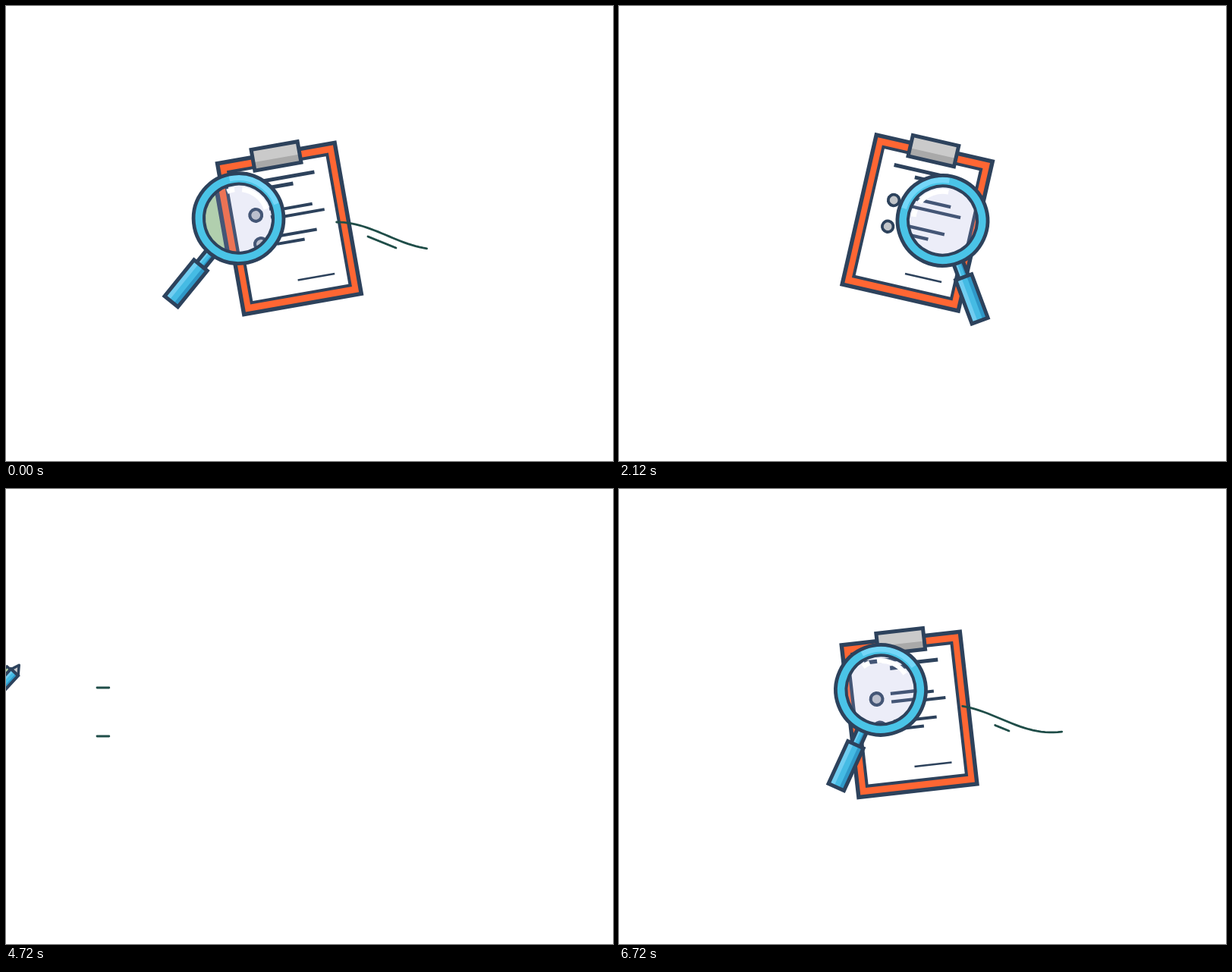
Recreate the animation shown at these times as an HTML page with a canvas. Size 800 by 600 pixels, loop 6.76 s.

```html
<!DOCTYPE html>
<html lang="en">
<head>
<meta charset="utf-8">
<title>Clipboard review</title>
<style>
  html, body { margin: 0; width: 100%; height: 100%; overflow: hidden; background: #fff; }
  canvas { display: block; width: 800px; height: 600px; }
</style>
</head>
<body>
<canvas id="stage" width="800" height="600"></canvas>
<script>
const ctx = document.getElementById('stage').getContext('2d');
const LOOP = 6760, STEP = 40, RESET = 4780;
const NAVY = '#2d425c', ORANGE = '#ff6633', TRAIL = '#1f4d48', GREEN = '#b5d9a2';
const RAD = Math.PI / 180, PEN_TILT = 42.5, PEN_REACH = 84.5;

const lerp = (a, b, k) => a + (b - a) * k;
const linear = (t, a, b) => Math.min(1, Math.max(0, (t - a) / (b - a)));
const ramp = (t, a, b) => {
  const k = linear(t, a, b);
  return k * k * (3 - 2 * k);
};
const wobble = (t, start) =>
  t < start ? 0 : Math.exp((start - t) / 120) * Math.sin((t - start) / 70);

function placed(x, y, angle, sx, sy, draw) {
  ctx.save();
  ctx.translate(x, y);
  ctx.rotate(angle * RAD);
  ctx.scale(sx, sy);
  draw();
  ctx.restore();
}

function paint(fill, stroke, width) {
  if (fill) { ctx.fillStyle = fill; ctx.fill(); }
  if (stroke) { ctx.strokeStyle = stroke; ctx.lineWidth = width; ctx.stroke(); }
}

function box(x, y, w, h, fill, stroke, width) {
  ctx.beginPath();
  ctx.rect(x, y, w, h);
  paint(fill, stroke, width);
}

function poly(points, fill, stroke, width, close = true) {
  ctx.beginPath();
  points.forEach(p => ctx.lineTo(p[0], p[1]));
  if (close) ctx.closePath();
  paint(fill, stroke, width);
}

function arc(r, a0, a1, color, width, fill) {
  ctx.beginPath();
  ctx.arc(0, 0, r, a0 * RAD, a1 * RAD);
  paint(fill, color, width);
}

function rule(x, y, length, width) {
  if (length > 0) poly([[x, y], [x + length, y]], null, NAVY, width, false);
}

// Three-tone bar with an outline, centred on x = 0.
function bar(y, w, h, outline) {
  box(-w / 2, y, w, h, '#45bbe4');
  box(-w / 2, y, w * 0.36, h, '#70cdf1');
  box(w * 0.18, y, w * 0.32, h, '#2f98c8');
  box(-w / 2, y, w, h, null, NAVY, outline);
}

// Time runs from -1980 (new board appears) to 4780 (old board is gone).
function boardPose(t) {
  const fall = ramp(t, -1560, -1320), rise = ramp(t, -1320, -1100);
  const hit = ramp(t, -150, 88), lift = ramp(t, -60, 100), sink = ramp(t, 300, 800);
  const slide = ramp(t, 780, 1290), swing = ramp(t, 820, 1290);
  const sign = ramp(t, 3440, 3680);
  const windup = ramp(t, 4220, 4440), leave = linear(t, 4400, 4740) ** 2;
  return {
    x: 399 - 37 * hit + 31.2 * slide + 14.4 * sign + 52 * windup - 680 * leave,
    y: 232 + 93.5 * fall - 27.5 * rise - 14 * lift + 5.6 * sink - 3.6 * swing + 5 * sign,
    angle: -14.5 * hit + 27.4 * swing + 6 * wobble(t, 1150) - 17.9 * sign -
      9 * wobble(t, 3560) + 6 * windup - 13 * leave,
    scale: ramp(t, -1940, -1720)
  };
}

function glassPose(t) {
  const enter = ramp(t, -316, 54), tilt = ramp(t, -231, 59);
  const turn = ramp(t, 600, 1081), cross = ramp(t, 640, 1200);
  const windup = ramp(t, 2320, 2560), back = ramp(t, 2560, 2800), dive = ramp(t, 2800, 3040);
  return {
    x: 658 - 373 * enter + 141.5 * cross + 34 * windup - 116 * back + 166 * dive * dive,
    y: 283 - 21 * ramp(t, -500, -150) + 28 * ramp(t, -60, 40) - 23 * ramp(t, 640, 960) +
      16 * ramp(t, 940, 1240) - 11 * windup + 28 * back + 50 * dive,
    angle: -40 + 88.5 * tilt - 68.9 * turn - 8 * wobble(t, 1080) + 8 * windup +
      20 * back - 68 * dive
  };
}

// Zigzag signature, drawn up to n strokes.
function signature(t) {
  const n = 6 * linear(t, 3780, 4220), whole = Math.floor(n);
  const knot = i => [1 + 8 * i, i % 2 ? 53.5 : 63.5];
  const points = [];
  for (let i = 0; i <= whole; i++) points.push(knot(i));
  if (n > whole) points.push(knot(whole).map((v, c) => lerp(v, knot(whole + 1)[c], n - whole)));
  return points;
}

function paper(t) {
  const grow = ramp(t, -1640, -1320), settle = ramp(t, -1320, -1160);
  const stretch = 1.08 * grow - 0.08 * settle;
  const offset = -40 + 27 * grow + 13 * settle;
  if (stretch > 0.03) {
    const w = 132 * Math.min(1, stretch), h = 179 * stretch - 4;
    box(-w / 2, offset - h / 2, w, h, '#fff', NAVY, 4);
  }
  return offset;
}

function board(t) {
  box(-78.5, -101, 157, 202, ORANGE, NAVY, 5.4);
  const offset = paper(t);
  const title = 92.4 * ramp(t, -1372, -1252), sub = 32 * ramp(t, -1280, -1160);
  rule(-0.7 - title / 2, -67.8 + offset * 0.45, title, 5);
  rule(-0.7 - sub / 2, -57.8, sub, 5);
  [55, 69.5, 55, 37].forEach((length, i) => {
    const row = i >> 1, start = -1160 + 50 * i;
    rule(-19.5, -27 + 34.2 * row + 10 * (i % 2), length * ramp(t, start, start + 160), 4);
    const r = 7.3 * ramp(t, -1220 + row * 100, -1080 + row * 100);
    if (i % 2 && r > 0) placed(-37, -22.3 + 35.6 * row, 0, 1, 1, () => arc(r, 0, 360, NAVY, 3.8, '#c2c5c9'));
  });
  rule(-0.8, 68.9, 49.3 * ramp(t, -960, -800), 2.5);
  poly(signature(t), null, NAVY, 2.5, false);
  const clip = ramp(t, -1260, -1080);
  if (clip > 0) placed(-0.5, -97.2, 0, clip, clip, () => {
    box(-31, -14, 62, 28, '#cacaca');
    box(-31, 3, 62, 11, '#a9a9a9');
    box(-31, -14, 62, 28, null, NAVY, 5);
  });
}

function magnified(t, x, y, r, pose) {
  ctx.save();
  ctx.beginPath();
  ctx.arc(x, y, r, 0, 7);
  ctx.clip();
  ctx.fillStyle = GREEN;
  ctx.fill();
  placed(pose.x, pose.y, pose.angle, 1.085, 1.085, () => {
    ctx.translate(-0.3, -0.8);
    board(t);
  });
  ctx.beginPath();
  ctx.arc(x, y, r, 0, 7);
  ctx.fillStyle = 'rgba(160,165,220,0.2)';
  ctx.fill();
  ctx.restore();
}

function glass(t, pose) {
  const { x, y, angle } = glassPose(t);
  const grow = ramp(t, -760, -640);
  const lens = grow * (1 - ramp(t, 2950, 3060));
  placed(x, y, angle, grow, grow, () => {
    bar(58, 13, 22, 5);
    bar(79.5, 22.5, 61.5, 5);
  });
  if (lens < 0.01) return;
  magnified(t, x, y, 45 * lens, pose);
  placed(x, y, angle, lens, lens, () => {
    arc(38.5, -152, -137, '#fff', 6.5);
    arc(38.5, -122, -58, '#fff', 6.5);
    arc(53, 0, 360, '#4ac4e7', 14);
    arc(53.5, -142, -60, '#74d6f8', 7);
    arc(59.4, 0, 360, NAVY, 4.8);
    arc(45.5, 0, 360, NAVY, 4);
  });
}

function penPose(t, pose) {
  const sweep = ramp(t, 3040, 3240), hold = ramp(t, 3260, 3840);
  const a = lerp(51, -46.7, sweep) * RAD, r = lerp(210, 141.5, sweep);
  const [hx, hy] = signature(t).pop();
  const c = Math.cos(pose.angle * RAD), s = Math.sin(pose.angle * RAD);
  const restX = pose.x + hx * c - hy * s + PEN_REACH * Math.sin(PEN_TILT * RAD);
  const restY = pose.y + hx * s + hy * c - PEN_REACH * Math.cos(PEN_TILT * RAD);
  return {
    x: lerp(474 + r * Math.cos(a), restX, hold) + 60 * Math.sin(Math.PI * hold),
    y: lerp(236 + r * Math.sin(a), restY, hold),
    angle: lerp(lerp(-60, 12, sweep), PEN_TILT, hold),
    length: lerp(66, 110, sweep)
  };
}

function pen(t, pose) {
  const { x, y, angle, length } = penPose(t, pose);
  const tip = ramp(t, 3240, 3400);
  placed(x, y, angle, 1, 1, () => {
    ctx.lineJoin = 'round';
    if (tip > 0) {
      box(-12.5, -54, 7, 54 * tip, GREEN, NAVY, 3.5);
      placed(0, 56, 0, 1, tip, () => {
        poly([[-6, 0], [6, 0], [5.5, 11], [0, 28], [-5.5, 11]], '#c5c8cc', NAVY, 3.5);
        rule(-6, 11, 12, 3);
        poly([[-2.5, 20], [2.5, 20], [0, 28]], NAVY);
      });
      placed(0, -55, 0, 1, tip, () => poly([[-6, 0], [6.5, 0], [-2, -11]], '#c5c8cc', NAVY, 3.5));
    }
    ctx.lineJoin = 'miter';
    bar(-length / 2, 13, length, 4);
  });
}

function streak(curve, a, b) {
  if (Math.abs(b - a) < 0.01) return;
  const points = [];
  for (let i = 0; i <= 24; i++) points.push(curve(lerp(a, b, i / 24)));
  ctx.lineCap = 'round';
  poly(points, null, TRAIL, 2.8, false);
  ctx.lineCap = 'butt';
}

const quad = (p, c, q) => k => p.map((v, n) =>
  lerp(lerp(v, c[n], k), lerp(c[n], q[n], k), k));
const wave = x => [x, 303 - 18 * Math.cos((x - 436) / 134 * Math.PI)];
const dash = x => [x, 304 + (x - 477) * 0.405];
const orbit = a => [474 + 160 * Math.cos(a * RAD), 236 + 160 * Math.sin(a * RAD)];
const swings = [quad([225, 235], [233, 270], [270, 295]), quad([231, 232], [235, 251], [248, 267])];

function trails(t) {
  if (t > -480 && t < 180) {
    streak(wave, lerp(719, 425, ramp(t, -472, 61)), lerp(719, 425, ramp(t, -327, 279)));
    streak(dash, lerp(514, 455, ramp(t, -109, 77)), lerp(514, 455, ramp(t, 10, 160)));
  }
  if (t > 780 && t < 1080) {
    swings.forEach(curve => streak(curve, ramp(t, 930, 1080), ramp(t, 780, 910)));
  }
  const late = t - 3240, half = 6 * (1 - (late / 110) ** 2);
  if (half > 0) [37.4, -13].forEach(a => streak(orbit, a - late * 0.3 - half, a - late * 0.3 + half));
  if (t > 4460 && t < 4740) [262, 326].forEach((y, i) =>
    streak(x => [x, y], lerp(685, 120, ramp(t, 4460 + 40 * i, 4660)), lerp(685, 120, ramp(t, 4540, 4740))));
}

function draw(t) {
  ctx.fillStyle = '#fff';
  ctx.fillRect(0, 0, 800, 600);
  const pose = boardPose(t);
  if (t > -1940 && t < 4740) placed(pose.x, pose.y, pose.angle, pose.scale, pose.scale, () => board(t));
  trails(t);
  if (t > -760 && t < 3040) glass(t, pose);
  if (t >= 3040 && t < 4740) pen(t, pose);
}

function frame() {
  const t = Math.floor(performance.now() % LOOP / STEP) * STEP;
  draw(t < RESET ? t : t - LOOP);
  requestAnimationFrame(frame);
}
frame();
</script>
</body>
</html>
```
